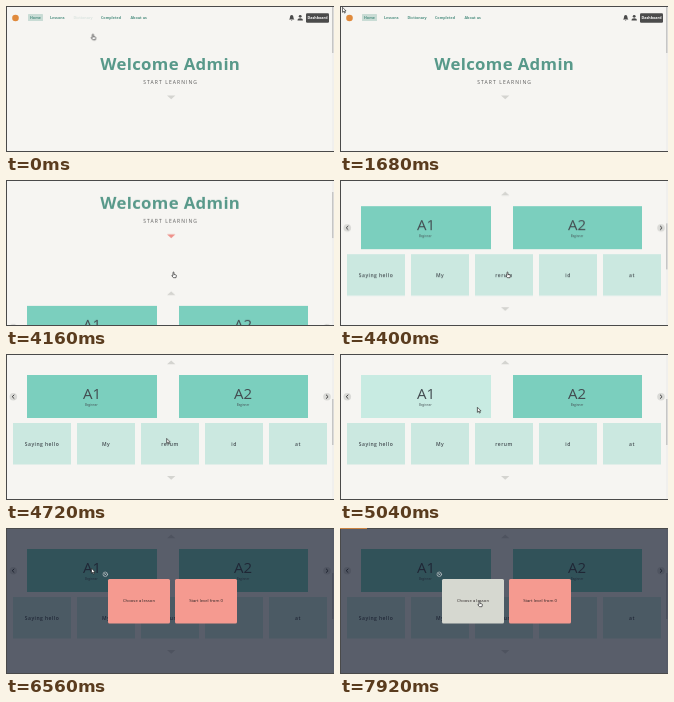
Animation, 328 px wide and 146 px high, one loop 8 s. Source, as an HTML page:

```html
<!DOCTYPE html>
<html lang="en">
<head>
<meta charset="utf-8">
<title>Lesson picker</title>
<style>
html, body { margin: 0; width: 100%; height: 100%; overflow: hidden; background: #f6f5f2; }
svg { display: block; width: 328px; height: 146px; font-family: "Open Sans", "Noto Sans", sans-serif; }

/* One percent of the loop is 80 ms. */
.page, .thumb, .cursor, .arrow, .hand, .faded, .hint, .level, .modal, .choice, .bar {
  animation: 8s linear infinite;
}
.page { animation-name: scroll; }
.thumb { animation-name: thumb; }
.cursor { animation-name: move; }
.arrow { animation-name: arrow; animation-timing-function: step-end; }
.hand { animation-name: hand; animation-timing-function: step-end; }
.faded { animation-name: restore; }
.hint { animation-name: hint; }
.level { animation-name: level; }
.modal { animation-name: modal; animation-timing-function: step-end; }
.choice { animation-name: choice; }
.bar { animation-name: load; transform-origin: 0 0; }

@keyframes scroll {
  0%, 50% { transform: translateY(0); animation-timing-function: ease-in-out; }
  55.8%, 100% { transform: translateY(-140px); }
}
@keyframes thumb {
  0%, 50% { transform: translateY(0); animation-timing-function: ease-in-out; }
  55.8%, 100% { transform: translateY(44px); }
}
@keyframes move {
  0% { transform: translate(87px, 31px); }
  3%, 5% { transform: translate(178px, 69px); }
  7% { transform: translate(216px, 66px); animation-timing-function: ease-in-out; }
  15% { transform: translate(9px, 3px); }
  17%, 18% { transform: translate(7px, 3px); }
  20%, 25% { transform: translate(4px, 4px); animation-timing-function: ease-in-out; }
  35% { transform: translate(168px, 60px); animation-timing-function: ease-in-out; }
  42% { transform: translate(170px, 100px); }
  46%, 58% { transform: translate(168px, 95px); }
  63% { transform: translate(139px, 56px); animation-timing-function: ease-out; }
  70% { transform: translate(99px, 48px); }
  74% { transform: translate(92px, 45px); }
  77%, 82% { transform: translate(87px, 43px); animation-timing-function: ease-in-out; }
  92% { transform: translate(138px, 73px); }
  96%, 100% { transform: translate(140px, 76px); }
}
@keyframes hand {
  0% { opacity: 1; }
  1% { opacity: 0; }
  43% { opacity: 1; }
  59% { opacity: 0; }
  90%, 100% { opacity: 1; }
}
@keyframes arrow {
  0% { opacity: 0; }
  1% { opacity: 1; }
  43% { opacity: 0; }
  59% { opacity: 1; }
  90%, 100% { opacity: 0; }
}
@keyframes restore { 0% { opacity: .15; } 3%, 100% { opacity: 1; } }
@keyframes hint { 0%, 42% { fill: #d4d4d0; } 45%, 100% { fill: #ee9089; } }
@keyframes level {
  0%, 60.5% { fill: #7bcfbe; }
  63%, 81.9% { fill: #c8ebe2; }
  82%, 100% { fill: #7bcfbe; }
}
@keyframes modal { 0% { visibility: hidden; } 82%, 100% { visibility: visible; } }
@keyframes choice { 0%, 89.5% { fill: #f59a90; } 92%, 100% { fill: #d6d8d0; } }
@keyframes load { 0%, 96% { transform: scaleX(0); } 99%, 100% { transform: scaleX(1); } }

.mid { text-anchor: middle; }
.nav { font-size: 3.7px; font-weight: 700; fill: #4f9082; }
.title { font-size: 16.8px; font-weight: 700; letter-spacing: .35px; fill: #58998a; }
.sub { font-size: 5px; letter-spacing: 1.08px; fill: #555; }
.name { font-size: 15px; fill: #434b50; }
.grade { font-size: 3px; fill: #434b50; }
.word { font-size: 5px; font-weight: 600; letter-spacing: .45px; fill: #434b50; }
.pick { font-size: 4.25px; font-weight: 500; fill: #2b2323; }
.line { fill: none; stroke-linecap: round; stroke-linejoin: round; }
</style>
</head>
<body>
<svg viewBox="0 0 328 146">
  <rect width="328" height="146" fill="#f6f5f2"/>

  <g class="page">
    <circle cx="9.5" cy="12" r="3.3" fill="#e08a3c"/>
    <g class="nav">
      <rect x="22" y="8" width="15" height="7" rx=".6" fill="#c9dcd5"/>
      <text class="mid" x="29.5" y="12.8">Home</text>
      <text x="44" y="12.8">Lessons</text>
      <text class="faded" x="67.5" y="12.8">Dictionary</text>
      <text x="95" y="12.8">Completed</text>
      <text x="124.5" y="12.8">About us</text>
    </g>
    <g fill="#4b4b4b">
      <path d="M283 13.5Q284 12.8 284 11Q284 9 285.7 9Q287.4 9 287.4 11Q287.4 12.8 288.4 13.5ZM285 14h1.4l-.7.8z"/>
      <circle cx="294.2" cy="10.3" r="1.4"/>
      <path d="M291.5 14.5Q291.5 12.2 294.2 12.2T296.9 14.5Z"/>
      <rect x="300" y="7.2" width="23" height="9.6" rx="1.2"/>
    </g>
    <text class="nav mid" x="311.5" y="13.2" style="fill:#fff">Dashboard</text>

    <text class="title mid" x="164.2" y="63.8">Welcome Admin</text>
    <text class="sub mid" x="164.7" y="77.8">START LEARNING</text>
    <path class="hint" d="M161 89.5h8.4l-4.2 3.8z"/>

    <path d="M161 150.2h8.4l-4.2-3.8zM161 262h8.4l-4.2 3.8z" fill="#d4d4d0"/>
    <rect class="level" x="21" y="161" width="130" height="43"/>
    <rect x="173" y="161" width="129" height="43" fill="#7bcfbe"/>
    <g class="mid">
      <text class="name" x="86" y="185">A1</text>
      <text class="grade" x="85.3" y="191.5">Beginner</text>
      <text class="name" x="237" y="185">A2</text>
      <text class="grade" x="237" y="191.5">Beginner</text>
    </g>
    <g fill="#dadad7">
      <circle cx="7.3" cy="182.7" r="3.8"/>
      <circle cx="321" cy="182.7" r="3.8"/>
    </g>
    <path class="line" d="M8 181l-1.8 1.7 1.8 1.7M320.3 181l1.8 1.7-1.8 1.7" stroke="#333" stroke-width=".9"/>
    <g id="cards" class="mid"></g>
  </g>

  <rect x="326" width="2" height="146" fill="#f0efed"/>
  <rect class="thumb" x="326" y="1" width="1.5" height="46" fill="#c6c6c5"/>

  <g class="modal">
    <rect width="328" height="146" fill="#0f172a" fill-opacity=".68"/>
    <g class="line" stroke="#c9cdd0" stroke-width=".6">
      <circle cx="99.3" cy="46.3" r="2.3"/>
      <path d="M98.4 45.4l1.8 1.8m0-1.8l-1.8 1.8"/>
    </g>
    <rect class="choice" x="102" y="51" width="62" height="44.5" rx="1.5"/>
    <rect x="169" y="51" width="62" height="44.5" rx="1.5" fill="#f59a90"/>
    <text class="pick mid" x="133" y="74.4">Choose a lesson</text>
    <text class="pick mid" x="200" y="74.4">Start level from 0</text>
  </g>

  <path d="M0 .5H328M.5 0V146M0 145.5H328" stroke="#4a4a4a" fill="none"/>
  <rect class="bar" width="27" height="1" fill="#c9823f"/>

  <g class="cursor" fill="#fff" stroke="#222" stroke-width=".65" stroke-linejoin="round">
    <path class="arrow" d="M-1.5-2.7v5l1.2-1 .8 1.8.8-.4-.8-1.7h1.6z"/>
    <path class="hand" d="M-1-2.7q.6-.4 1 0V-.5l1.8.4q.7.2.6.9L2 2.7h-2.6L-2.2.6q.2-.7 1.2 0z"/>
  </g>
</svg>
<script>
const words = ["Saying hello", "My", "rerum", "id", "at"];
document.getElementById("cards").innerHTML = words.map((word, i) => {
  const x = 7 + 64 * i;
  return `<rect x="${x}" y="209" width="58" height="41.5" fill="#cbe8e0"/>
    <text class="word" x="${x + 29}" y="231.8">${word}</text>`;
}).join("");
</script>
</body>
</html>
```
